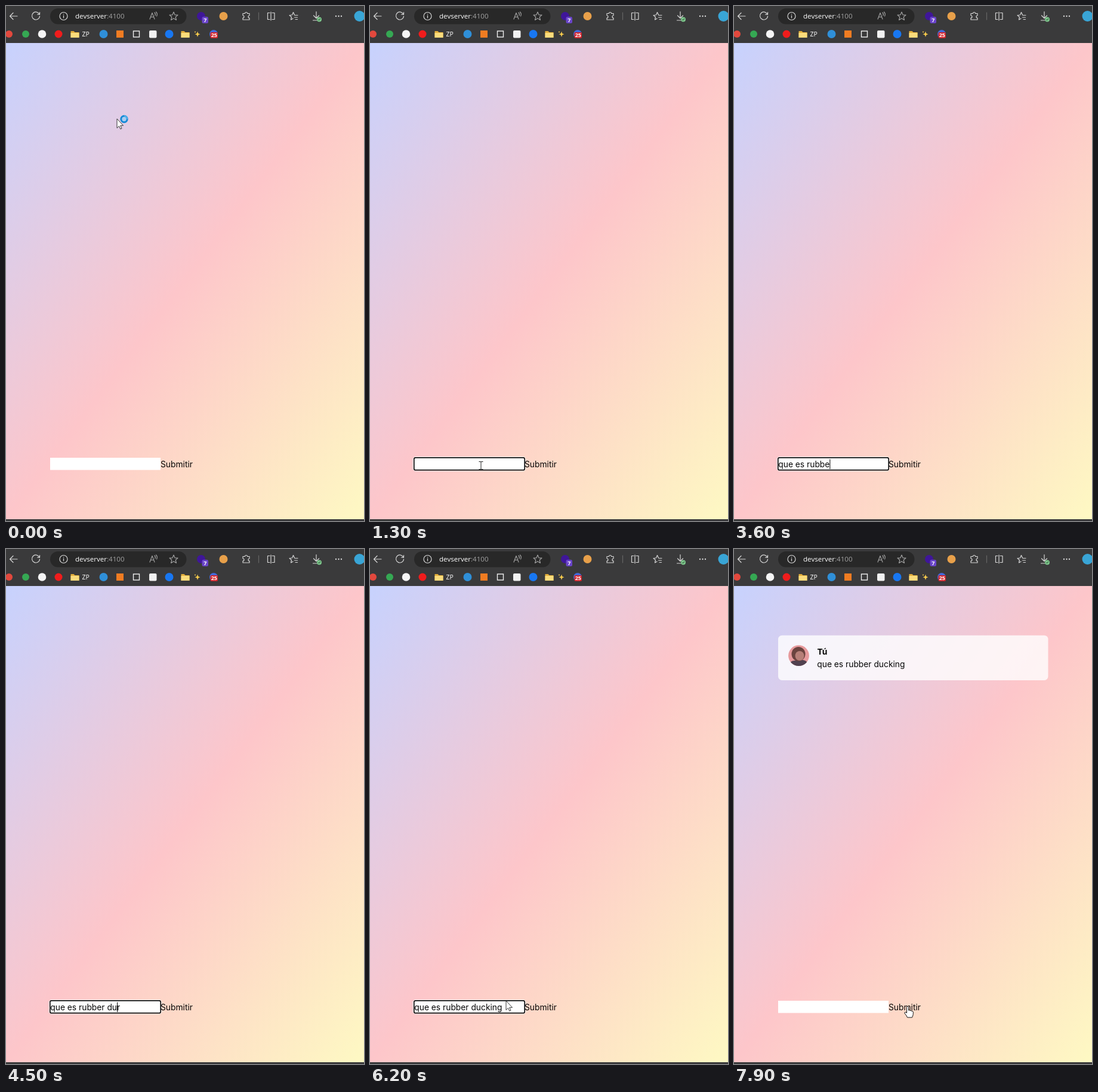
An HTML page for the animation above (8 s loop, 600x863 px).

```html
<!DOCTYPE html>
<html lang="es">
<head>
<meta charset="utf-8">
<title>Chat</title>
<style>
  html, body { margin: 0; width: 100%; height: 100%; overflow: hidden; background: #3a3a3b; }
  svg { display: block; width: 600px; height: 863px; }
  .page { font: 13.8px Inter, sans-serif; fill: #050505; white-space: pre; }
  .bar { font: 11.6px "Open Sans", "Noto Sans", sans-serif; fill: #fff; }
  .badge { font: bold 9px "Open Sans", sans-serif; fill: #fff; text-anchor: middle; }
  .line { fill: none; stroke: #d6d6d6; stroke-width: 1.2; stroke-linecap: round; stroke-linejoin: round; }
  .dim { stroke: #a0a0a0; }
</style>
</head>
<body>
<svg viewBox="0 0 600 863">
  <defs>
    <linearGradient id="sky" x1="0" y1="0" x2="1" y2="1">
      <stop offset="0" stop-color="#c7d2fe"/>
      <stop offset=".5" stop-color="#fdc6ca"/>
      <stop offset="1" stop-color="#fef9c3"/>
    </linearGradient>
    <path id="star" d="M0-7 2-2.2 7-1.9 3.2 1.5 4.4 6.4 0 3.8-4.4 6.4-3.2 1.5-7-1.9-2-2.2Z"/>
    <g id="folder">
      <path d="M-7-5h5l2 2h7V6H-7Z" fill="#e2ad3b"/>
      <path d="M-7-2H7V6H-7Z" fill="#fbdc7c"/>
    </g>
    <clipPath id="face"><circle cx="108.5" cy="178.7" r="17.4"/></clipPath>
  </defs>

  <rect width="600" height="863" fill="#3a3a3b"/>
  <rect y="62" width="600" height="798" fill="url(#sky)"/>

  <!-- address row -->
  <rect x="74" y="4" width="228.500" height="26.500" rx="13.200" fill="#282828"/>
  <g class="line">
    <path d="M19 17H7M12 11.500 6.500 17 12 22.500"/>
    <path d="M55.800 13.500A6.500 6.500 0 1 0 56.500 17M56.500 10.500V14.200H52.800"/>
    <circle cx="96.500" cy="17" r="6.500"/>
    <path d="M96.500 16V20M96.500 13.700V13.800"/>
    <path class="dim" d="M241 22 245 11.500 249 22M242.500 18.500H247.500M249 11q2 2 1 5M251.500 10q3 3 1 7"/>
    <use class="dim" href="#star" x="281" y="17"/>
    <path d="M397 12.500h3.500a2 2 0 1 1 4 0H408v3.500a2 2 0 1 0 0 4v3H397v-3a2 2 0 1 0 0-4Z"/>
    <path d="M423.500 11V23" stroke="#666"/>
    <path d="M442 11.500H438.500V22.500H442M446 11.500H450V22.500H446M444 10V24"/>
    <path d="M483.500 15 481.500 10.500 479.500 15 475 15.500 478.500 18.500 477.500 23 481 21M484 15.500H489M483.500 19H488.500M485 22.500H488.500"/>
    <path d="M520 9.500V20M515.500 16 520 20.500 524.500 16M514.500 24H521"/>
  </g>
  <text class="bar" x="116" y="21">devserver<tspan fill="#a2a2a2">:4100</tspan></text>
  <circle cx="327" cy="17" r="7" fill="#3f1699"/>
  <rect x="328.500" y="18" width="10.500" height="11" rx="2.500" fill="#6a45c9"/>
  <text class="badge" x="333.800" y="27">7</text>
  <circle cx="364.500" cy="17" r="7" fill="#e8a04a"/>
  <circle cx="525" cy="22.500" r="4" fill="#7cc58a"/>
  <path d="M523 22.500 524.500 24 527 21" fill="none" stroke="#20402a"/>
  <g fill="#d6d6d6">
    <circle cx="553" cy="17" r="1.200"/><circle cx="557.500" cy="17" r="1.200"/><circle cx="562" cy="17" r="1.200"/>
  </g>
  <circle cx="592.500" cy="17" r="9" fill="#39a5d6"/>

  <!-- bookmarks -->
  <circle cx="5" cy="47" r="6" fill="#e2483d"/>
  <circle cx="33" cy="47" r="6" fill="#35a853"/>
  <circle cx="60.500" cy="47" r="6.800" fill="#f5f5f5"/>
  <circle cx="88" cy="47" r="6.500" fill="#f01c1c"/>
  <use href="#folder" x="115.500" y="47"/>
  <text class="bar" x="127.500" y="51" style="font-size:10.5px">ZP</text>
  <circle cx="163.500" cy="47" r="7" fill="#2f8fd8"/>
  <rect x="185" y="41" width="12" height="12" fill="#f07c22"/>
  <rect x="213.500" y="42" width="10" height="10" fill="none" stroke="#f0f0f0" stroke-width="1.400"/>
  <rect x="240" y="41" width="12.500" height="12.500" rx="2" fill="#f2f2f2"/>
  <circle cx="273.500" cy="47" r="7" fill="#1877f2"/>
  <use href="#folder" x="300.500" y="47"/>
  <path d="M321 42.500 322.200 46 325.500 47.300 322.200 48.500 321 52 319.800 48.500 316.500 47.300 319.800 46Z" fill="#f8cc4c"/>
  <circle cx="317" cy="43.500" r="1" fill="#f8cc4c"/>
  <circle cx="348" cy="47" r="7" fill="#4468d8"/>
  <rect x="342.500" y="44" width="12.500" height="10" rx="2" fill="#d4252c"/>
  <text class="badge" x="348.800" y="52.300">25</text>

  <!-- message -->
  <g id="card" class="page">
    <rect x="74" y="144.700" width="452.500" height="75.300" rx="6.500" fill="#fff" fill-opacity=".8"/>
    <text x="139.500" y="177.200" font-weight="700">Tú</text>
    <text x="139.300" y="198">que es rubber ducking</text>
    <g id="avatar" clip-path="url(#face)">
      <rect x="90" y="160" width="37" height="38" fill="#e79a9d"/>
      <path d="M91 198Q93 186 103 187L116 186Q125 188 126 198Z" fill="#51414f"/>
      <ellipse cx="108" cy="176" rx="11.500" ry="12" fill="#6b433f"/>
      <ellipse cx="110" cy="179" rx="7.500" ry="8" fill="#b77f78"/>
    </g>
  </g>

  <!-- form -->
  <rect x="74" y="757" width="185" height="20.500" fill="#fff"/>
  <g id="ring" fill="none">
    <rect x="72.500" y="755.500" width="188" height="23.500" rx="3.500" stroke="#fff" stroke-opacity=".8"/>
    <rect x="73.800" y="756.800" width="185.400" height="20.900" rx="2.500" stroke="#101010" stroke-width="1.700"/>
  </g>
  <text id="entry" class="page" x="74.300" y="772.600"></text>
  <rect id="caret" y="759.500" width="1" height="16.500" fill="#000"/>
  <text class="page" x="259" y="772.600">Submitir</text>

  <!-- pointers, each with its hot spot at 0,0 -->
  <g id="arrow">
    <path d="M0 0V15.500L3.500 12.200 5.800 17.200 8 16.200 5.800 11.300H10.500Z" fill="#fff" stroke="#222" stroke-width=".9"/>
    <g id="busy" transform="translate(12 .5)">
      <circle r="5.200" fill="#a9cdf0" stroke="#168ad6" stroke-width="3"/>
      <path id="spin" d="M0-5.200A5.200 5.200 0 0 1 5.200 0" fill="none" stroke="#54b5ee" stroke-width="2"/>
    </g>
  </g>
  <path id="beam" d="M-3.500-6.500H-1Q0-6.500 0-5.500V5.500Q0 6.500-1 6.500H-3.500M3.500-6.500H1Q0-6.500 0-5.500M3.500 6.500H1Q0 6.500 0 5.500" fill="none" stroke="#222"/>
  <path id="hand" d="M-1.500 1Q0-1.500 1.500 1V6.500Q3.500 5.500 4.200 7.200 6.200 6.300 7 8 9 7.300 9.300 9.300V13Q9 15.500 7.500 18.500H-.5Q-2-15.500 -2 15.500L-5 11.500Q-5.500 9-3 9.500L-1.500 11Z" fill="#fff" stroke="#111" stroke-width="1"/>
</svg>
<script>
  const LOOP = 8000, FOCUS = 1150, SEND = 6800, AVATAR = 7400, BLINK = 530;
  const $ = id => document.getElementById(id);
  const [card, avatar, ring, entry, caret, arrow, busy, spin, beam, hand] =
    ['card', 'avatar', 'ring', 'entry', 'caret', 'arrow', 'busy', 'spin', 'beam', 'hand'].map($);

  // Tidy the hand outline
  hand.setAttribute('d', 'M-1.500 1Q0-1.500 1.500 1V6.500Q3.500 5.500 4.200 7.200 6.200 6.300 7 8 9 7.300 9.300 9.300V13Q9 15.500 7.500 18.500H-.5L-2 15.500-5 11.500Q-5.500 9-3 9.500L-1.500 11Z');

  // Typing bursts: start, end, text before, text added
  const bursts = [
    [1900, 2500, '', 'que e'],
    [2650, 3750, 'que e', 's rubber'],
    [3950, 4450, 'que es rubber', ' dur'],
    [4700, 5450, 'que es rubber du', 'cking']
  ];
  // Pointer path: time, x, y
  const path = [[0, 186, 189], [500, 186, 189], [1100, 186, 770], [5650, 186, 770],
                [6200, 228, 757], [6600, 291, 766.500], [LOOP, 291, 766.500]];

  const show = (el, on) => el.style.display = on ? '' : 'none';
  const ease = p => p * p * (3 - 2 * p);

  function typed(t) {
    const b = bursts.filter(b => t >= b[0]).pop();
    if (!b || t >= SEND) return { text: '', last: FOCUS };
    const [start, end, before, added] = b;
    const step = (end - start) / (added.length - 1);
    const n = Math.min(added.length, Math.floor((t - start) / step + 1e-6) + 1);
    return { text: before + added.slice(0, n), last: start + (n - 1) * step };
  }

  function pointer(t) {
    const i = path.findIndex((p, k) => k && t <= p[0]);
    const [t0, x0, y0] = path[i - 1], [t1, x1, y1] = path[i];
    const p = ease((t - t0) / (t1 - t0));
    return [x0 + (x1 - x0) * p, y0 + (y1 - y0) * p];
  }

  function render(t) {
    const { text, last } = typed(t);
    const focused = t >= FOCUS && t < SEND - 150;
    if (entry.textContent !== text) entry.textContent = text;
    show(ring, focused);
    show(caret, focused && text && (t - last) % (2 * BLINK) < BLINK);
    // The caret trails the mistyped letter that is about to be removed
    const lag = text.endsWith('dur') ? 1 : 0;
    const width = text ? entry.getSubStringLength(0, text.length - lag) : 0;
    caret.setAttribute('x', 74.300 + width);

    const [x, y] = pointer(t);
    const inRow = y > 758 && y < 778;
    const shape = !inRow ? arrow : x < 259 ? beam : hand;
    const hidden = t > 3000 && t < 5650;
    for (const el of [arrow, beam, hand]) show(el, el === shape && !hidden);
    shape.setAttribute('transform', `translate(${x} ${y})`);
    show(busy, t < 500);
    spin.setAttribute('transform', `rotate(${t * .36})`);

    show(card, t >= SEND);
    show(avatar, t >= AVATAR);
  }

  const begin = performance.now();
  function tick() {
    render((performance.now() - begin) % LOOP);
    requestAnimationFrame(tick);
  }
  tick();
</script>
</body>
</html>
```
